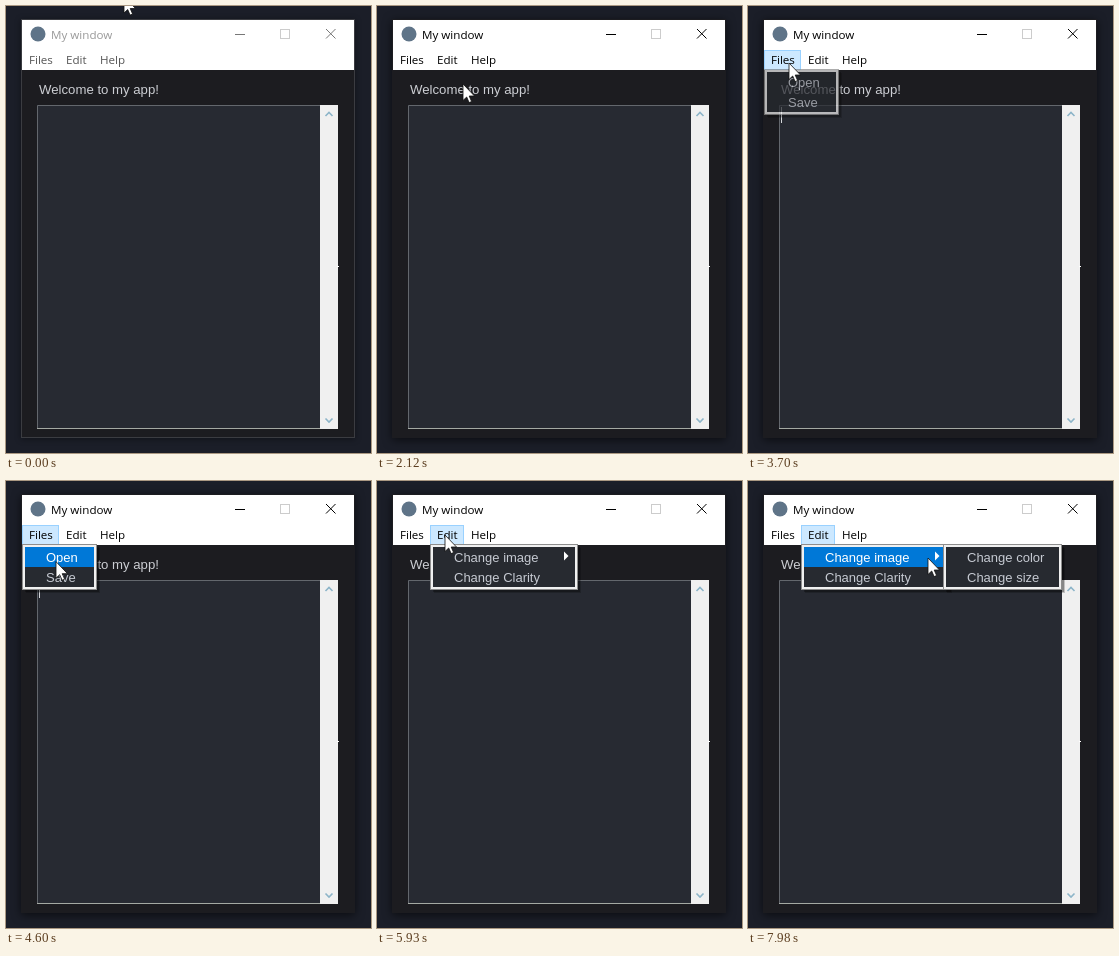
These frames come from a looping animation (365x447 px, 8000 ms). An HTML page:

```html
<!DOCTYPE html>
<html lang="en">
<head>
<meta charset="utf-8">
<title>My window</title>
<style>
  html, body { margin: 0; width: 100%; height: 100%; overflow: hidden; background: #1b1e28; }
  svg { display: block; }
  text { white-space: pre; }
  .ui { font: 11.6px "Open Sans", "Noto Sans", sans-serif; fill: #000; }
  .app { font: 13.2px "Liberation Sans", Arial, sans-serif; fill: #ccced3; }
  .menu text { font: 13px "Liberation Sans", Arial, sans-serif; fill: #c6cad2; }
  .menu .on rect { fill: #0078d7; }
  .menu .on text { fill: #fff; }
  #frame { filter: drop-shadow(0 2px 5px rgba(0, 0, 0, .6)); }
  .buttons { fill: none; stroke: #000; }
  .inactive .title { fill: #999; }
  .inactive .bar { fill: #555; }
  .inactive .buttons { stroke: #777; }
  .inactive #frame { stroke: #3b3c41; filter: drop-shadow(0 1px 3px rgba(0, 0, 0, .4)); }
</style>
</head>
<body>
<svg id="stage" width="365" height="447" viewBox="0 0 365 447">
  <rect id="frame" x="15.5" y="13.5" width="333" height="418" fill="#1c1c20" stroke="#1c1c20"/>
  <rect x="16" y="14" width="332" height="50" fill="#fff"/>
  <circle cx="32" cy="28" r="7.5" fill="#5f7488"/>
  <text class="ui title" x="45" y="33">My window</text>
  <g class="buttons">
    <path d="M229 28.5h10M320 23l9.5 9.5M329.5 23l-9.5 9.5"/>
    <rect x="274.5" y="23.5" width="9" height="9" stroke="#ccc"/>
  </g>
  <rect id="tab" y="44.5" height="19"/>
  <text class="ui bar" x="23" y="58">Files</text>
  <text class="ui bar" x="60" y="58">Edit</text>
  <text class="ui bar" x="94" y="58">Help</text>
  <text class="app" x="33" y="88">Welcome to my app!</text>
  <rect x="31" y="99" width="284" height="324" fill="#272a32"/>
  <path d="M31.5 423V99.5H315" fill="none" stroke="#63676d"/>
  <path d="M31 422.5H315" stroke="#a4a9a3"/>
  <rect x="314" y="99" width="18" height="324" fill="#f0f0f0"/>
  <path d="M319.5 110l3.5-3.5 3.5 3.5M319.5 412.5l3.5 3.5 3.5-3.5" fill="none" stroke="#8db5c9" stroke-width="1.6"/>
  <rect x="331" y="260" width="2" height="1" fill="#fff"/>
  <path id="caret" d="M33.5 101v16" stroke="#d4d6da"/>
  <g id="menus"></g>
  <circle id="press" r="12" fill="#ffff50" fill-opacity=".75"/>
  <path id="arrow" d="M0 0V16.5L3.7 13 6.1 18.6 8.6 17.5 6.2 12H11.5Z" fill="#fff" stroke="#111" stroke-width=".8"/>
  <path id="beam" d="M-3 -8.5h2.5l.5.5.5-.5H3M0 -8V8M-3 8.5h2.5l.5-.5.5.5H3" fill="none" stroke="#e4e4e4"/>
</svg>
<script>
const LOOP = 8000;
const $ = id => document.getElementById(id);

// Pointer stops: time, x, y; each leg eases in and out.
const stops = [
  [270, 118, -9.5], [430, 145.5, 54], [590, 145.5, 54], [860, 145.5, 31],
  [1400, 145.5, 31], [2060, 86, 78], [2120, 86, 78], [2420, 117, 131],
  [2540, 117, 131], [3500, 41, 57], [3880, 41, 57], [4030, 50, 78],
  [4500, 50, 78], [4930, 50, 97], [5250, 50, 97], [5360, 51, 85],
  [5620, 51, 57], [5900, 68, 54], [6600, 68, 54], [6900, 75, 80],
  [7640, 75, 80], [7970, 180, 77]
];
const presses = [[1250, 1380], [2430, 2530], [3560, 3670]];
const blinks = [2430, 3060, 3380, 4020, 4320, 4950, 5260, 5890, 6230, 6860, 7140, 7770];

function menu(x, width, labels, arrow = '') {
  const g = document.createElementNS('http://www.w3.org/2000/svg', 'g');
  g.setAttribute('class', 'menu');
  g.innerHTML = `
    <rect x="${x + 4}" y="67" width="${width - 1}" height="45" fill="#000" opacity=".2"/>
    <rect x="${x + 3}" y="66" width="${width - 1}" height="45" fill="#000" opacity=".3"/>
    <rect x="${x}" y="63" width="${width}" height="46" fill="#8d8d8d"/>
    <rect x="${x + 1}" y="64" width="${width - 2}" height="44" fill="#f0f0f0"/>` +
    labels.map((label, i) => `<g class="item">
      <rect x="${x + 3}" y="${66 + 20 * i}" width="${width - 6}" height="20" fill="#272a30"/>
      <text x="${x + 24}" y="${81 + 20 * i}">${label}</text></g>`).join('') + arrow;
  $('menus').append(g);
  return { g, x, width, items: [...g.querySelectorAll('.item')] };
}
const files = menu(16, 75, ['Open', 'Save']);
const edit = menu(53, 148, ['Change image', 'Change Clarity'], '<path d="M187 70.5v9l4.5-4.5z" fill="#fff"/>');
const submenu = menu(195, 119, ['Change color', 'Change size']);

function pointer(t) {
  const next = stops.findIndex(s => s[0] > t);
  if (next === 0) return stops[0].slice(1);
  if (next < 0) return stops.at(-1).slice(1);
  const [t0, x0, y0] = stops[next - 1], [t1, x1, y1] = stops[next];
  const u = (t - t0) / (t1 - t0), k = u * u * (3 - 2 * u);
  return [x0 + (x1 - x0) * k, y0 + (y1 - y0) * k];
}

const show = (el, visible) => el.setAttribute('visibility', visible ? 'visible' : 'hidden');
const set = (el, attrs) => Object.entries(attrs).forEach(([k, v]) => el.setAttribute(k, v));

function showMenu(m, opacity, x, y) {
  show(m.g, opacity > 0);
  m.g.setAttribute('opacity', Math.min(1, opacity));
  m.items.forEach((item, i) => {
    const top = 66 + 20 * i;
    const over = x > m.x + 3 && x < m.x + m.width - 3 && y >= top && y < top + 20;
    item.classList.toggle('on', opacity > 0 && over);
  });
}

function draw(t) {
  const [x, y] = pointer(t);
  const filesOpen = t >= 3690 && !(t > 5600 && x >= 53);
  const editOpen = t > 5600 && x >= 53;
  const menuOpen = filesOpen || editOpen;
  $('stage').classList.toggle('inactive', t < 1250);

  const hover = t > 2500 && x < 53 && y < 64;
  show($('tab'), menuOpen || hover);
  set($('tab'), {
    x: editOpen ? 53.5 : 16.5, width: editOpen ? 33 : 36,
    fill: menuOpen ? '#cce8ff' : '#e5f3ff', stroke: menuOpen ? '#99d1ff' : '#cce8ff'
  });

  show($('caret'), blinks.filter(b => b <= t).length % 2);
  showMenu(files, filesOpen ? .72 + (t - 3700) / 143 : 0, x, y);
  showMenu(edit, editOpen ? 1 : 0, x, y);
  showMenu(submenu, (t - 7145) / 185, x, y);

  show($('press'), presses.some(([a, b]) => t >= a && t < b));
  set($('press'), { cx: x, cy: y - 1 });
  const overText = !menuOpen && x > 31 && x < 314 && y > 99;
  for (const id of ['arrow', 'beam']) {
    show($(id), (id === 'beam') === overText);
    set($(id), { transform: `translate(${x} ${y})` });
  }
}

const start = performance.now();
(function tick() {
  draw((performance.now() - start) % LOOP);
  requestAnimationFrame(tick);
})();
</script>
</body>
</html>
```
